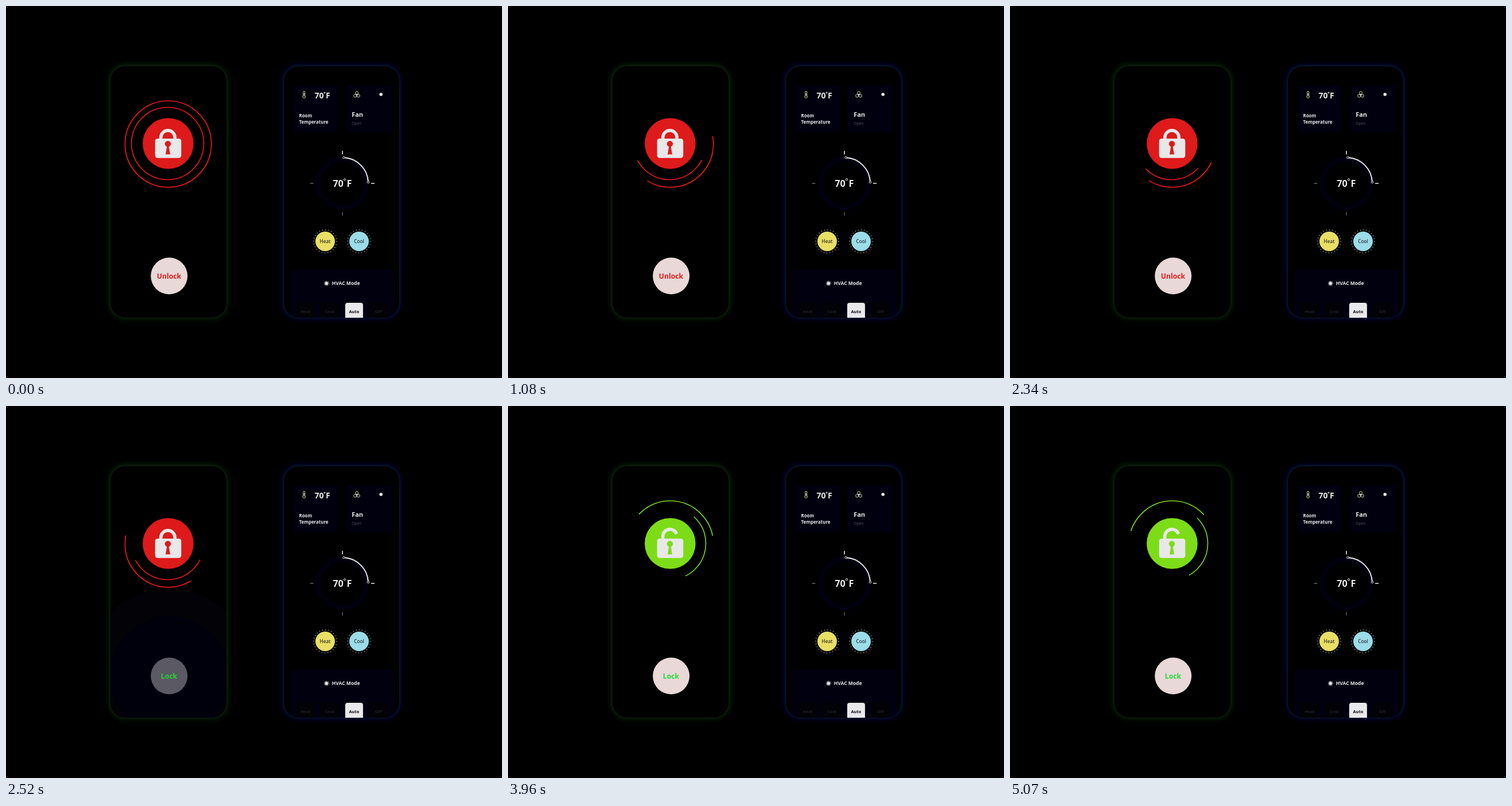
Animation of 864x648 px, one loop 5.1 s. Source, as an HTML page:

```html
<!DOCTYPE html>
<html lang="en">
<head>
<meta charset="utf-8">
<style>
html, body { margin: 0; width: 100%; height: 100%; overflow: hidden; background: #000; }
svg { display: block; width: 864px; height: 648px; }
text { font-family: "Open Sans", "Noto Sans", sans-serif; font-weight: 700; fill: #e9e9ec; }
.mid { text-anchor: middle; }
.panel { fill: #00000f; }
.line { fill: none; stroke: #e9e9ec; }
</style>
</head>
<body>
<svg viewBox="0 0 864 648">
  <defs>
    <filter id="glow" x="-20%" y="-20%" width="140%" height="140%"><feGaussianBlur stdDeviation="5"/></filter>
    <clipPath id="leftScreen"><rect x="182" y="105" width="202" height="438" rx="26"/></clipPath>
    <clipPath id="rightScreen"><rect x="484" y="105" width="202" height="438" rx="26"/></clipPath>
    <clipPath id="outerWipe"><path/></clipPath>
    <clipPath id="innerWipe"><path/></clipPath>
  </defs>
  <rect width="864" height="648"/>

  <rect x="179" y="102" width="208" height="443" rx="28" fill="#082808" filter="url(#glow)"/>
  <rect x="181.5" y="104.5" width="203" height="438.5" rx="26" stroke="#061c07"/>
  <g clip-path="url(#leftScreen)">
    <g id="ripple">
      <circle cx="284" cy="470" fill="#030207"/>
      <circle cx="284" cy="470" fill="#00000c"/>
    </g>
  </g>
  <g id="rings" fill="none" stroke-width="1.6">
    <circle cx="282.5" cy="240.5" r="75.2" clip-path="url(#outerWipe)"/>
    <circle cx="281.5" cy="239.5" r="63" clip-path="url(#innerWipe)"/>
  </g>
  <circle id="badge" cx="282.4" cy="239.5" r="44.3"/>
  <path id="shackle" fill="none" stroke="#e8e8e8" stroke-width="5.6"/>
  <rect x="259.7" y="231" width="45.6" height="33.8" rx="4.5" fill="#e8e8e8"/>
  <path id="keyhole" d="M280.3 245L278 258.5H286L283.7 245A5.2 5.2 0 1 0 280.3 245Z"/>
  <circle id="button" cx="284.2" cy="470.3" r="32"/>
  <text id="label" class="mid" x="283.9" y="474.8" font-size="12.2"></text>

  <rect x="481" y="102" width="207" height="443" rx="28" fill="#001040" filter="url(#glow)"/>
  <rect x="483.5" y="104.5" width="202" height="438.5" rx="26" stroke="#001c30"/>
  <g clip-path="url(#rightScreen)">
    <rect class="panel" x="501" y="138" width="77" height="81" rx="5"/>
    <rect class="panel" x="593" y="138" width="78" height="81" rx="5"/>
    <rect x="511" y="146" width="16" height="16" rx="3"/>
    <rect x="603" y="146" width="16" height="16" rx="3"/>
    <path class="line" stroke-width=".9" d="M517.7 155.8V150a1.5 1.5 0 0 1 3 0V155.8a2.5 2.5 0 1 1 -3 0Z"/>
    <path class="line" d="M519.2 152V158"/>
    <text x="537.5" y="160.5" font-size="14">70</text>
    <circle class="line" cx="555" cy="151" r="1.2" stroke-width=".9"/>
    <text x="557" y="160.5" font-size="14">F</text>
    <text x="510.5" y="194.3" font-size="7.9">Room</text>
    <text x="510.5" y="204.8" font-size="7.9">Temperature</text>
    <g class="line" stroke-width=".9">
      <circle cx="611" cy="151.4" r="2.6"/>
      <circle cx="608.2" cy="156.4" r="2.6"/>
      <circle cx="613.8" cy="156.4" r="2.6"/>
      <circle cx="611" cy="154.7" r="1"/>
    </g>
    <circle cx="653.2" cy="154" r="2.8" fill="#e9e9ec"/>
    <text x="602.2" y="193" font-size="11">Fan</text>
    <text x="602.2" y="206.5" font-size="6.7" style="font-weight:400;fill:#55555c">Open</text>

    <circle cx="586" cy="309" r="42" fill="none" stroke="#00000f" stroke-width="8"/>
    <path class="line" stroke-width="2" d="M588.5 264A45 45 0 0 1 631 306.5"/>
    <circle cx="588.5" cy="264" r="1.8" stroke="#e9e9ec"/>
    <circle cx="631" cy="306.7" r="1.8" stroke="#e9e9ec"/>
    <path class="line" stroke-width="1.6" d="M586 252.5V258.5M636 309H642"/>
    <path stroke="#66666a" stroke-width="1.3" d="M586 359V365M529.5 309H535.5"/>
    <text x="569.3" y="315" font-size="16.3">70</text>
    <circle class="line" cx="590" cy="302.3" r="1.7"/>
    <text x="593.4" y="315" font-size="16.3">F</text>

    <g fill="none" stroke-width="2.4">
      <circle cx="556" cy="410" r="20" stroke="#968d62" pathLength="72" stroke-dasharray=".6 2.4"/>
      <circle cx="615" cy="410" r="20" stroke="#7f898d" pathLength="72" stroke-dasharray=".6 2.4"/>
    </g>
    <circle cx="556" cy="410" r="17" fill="#e8df65"/>
    <circle cx="615" cy="410" r="17" fill="#9bdce8"/>
    <text class="mid" x="556" y="413" font-size="8.2" style="font-weight:600;fill:#37362a">Heat</text>
    <text class="mid" x="615" y="413" font-size="8.2" style="font-weight:600;fill:#26363b">Cool</text>

    <rect class="panel" x="494" y="460" width="183" height="90" rx="8"/>
    <circle cx="558.3" cy="483.2" r="2.6" fill="#e9e9ec"/>
    <circle class="line" cx="558.3" cy="483.2" r="3.4" stroke-width="2" pathLength="16" stroke-dasharray=".8 1.2"/>
    <text x="567.8" y="486.4" font-size="8.5">HVAC Mode</text>
    <g id="tabs"></g>
  </g>
</svg>
<script>
const LOOP = 5100, UNLOCK = 2730, TAP = 2370, HALF = 1800;
const RED = '#de1a1a', GREEN = '#7ddc18';
const $ = id => document.getElementById(id);
const set = (el, attrs) => { for (const k in attrs) el.setAttribute(k, attrs[k]); };

$('tabs').innerHTML = ['Heat', 'Cool', 'Auto', 'Off'].map((name, i) => {
  const on = name === 'Auto', x = 506.5 + i * 42.2;
  return `<rect x="${x}" y="517" width="31" height="40" rx="4" fill="${on ? '#e9e9ec' : '#020206'}"/>
    <text class="mid" x="${x + 15.5}" y="535" font-size="7.4" style="fill:${on ? '#08080c' : '#202026'}">${name}</text>`;
}).join('');

// Radial wipe: its pivot sits a little below the centre of the rings.
function wedge(mid, half) {
  half = Math.min(half, 179.99);
  const point = deg => {
    const a = deg * Math.PI / 180;
    return `${282.5 + 200 * Math.sin(a)} ${250 - 200 * Math.cos(a)}`;
  };
  return `M282.5 250L${point(mid - half)}A200 200 0 ${half > 90 ? 1 : 0} 1 ${point(mid + half)}Z`;
}

function draw(t) {
  const open = t >= UNLOCK, time = open ? t - UNLOCK : t;
  const color = open ? GREEN : RED;
  const half = Math.abs(HALF - time) / 10;
  const outerMid = (open ? 6 : 180) + 0.3 * time;
  const innerMid = open ? 92.7 : 180;
  set($('outerWipe').firstChild, { d: wedge(outerMid, half) });
  set($('innerWipe').firstChild, { d: wedge(innerMid, half) });
  set($('rings'), { stroke: open ? GREEN : '#f01a1c' });
  set($('badge'), { fill: color });
  set($('keyhole'), { fill: color });
  set($('shackle'), {
    d: open ? 'M269.8 232V226A12.2 12.2 0 0 1 293.5 223' : 'M269.8 233V229A12.2 12.2 0 0 1 294.2 229V233'
  });

  const press = (t - TAP) / 330, pressed = press >= 0 && press < 1;
  const radius = pressed ? 60 + 198 * press : 0;
  const [wide, core] = $('ripple').children;
  set(wide, { r: radius });
  set(core, { r: radius * 0.69 });
  set($('ripple'), { opacity: Math.min(1, (1 - press) * 2) });
  set($('button'), { fill: pressed ? '#5b5963' : '#e8d8d8' });
  const label = $('label'), tapped = t >= TAP;
  label.textContent = tapped ? 'Lock' : 'Unlock';
  label.style.fill = tapped ? '#25d832' : RED;
}

const start = performance.now();
function tick() {
  draw((performance.now() - start) % LOOP);
  requestAnimationFrame(tick);
}
tick();
</script>
</body>
</html>
```
